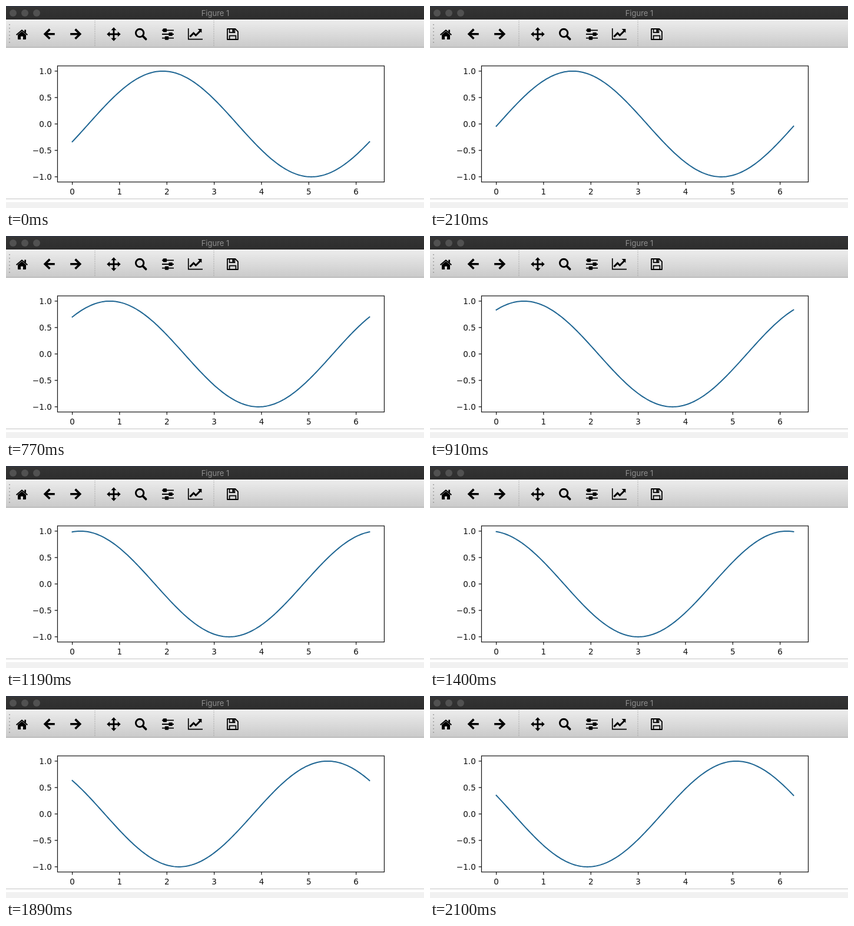
These frames come from a looping animation (710 px wide and 344 px high, 2170 ms). An HTML page:

```html
<!DOCTYPE html>
<html lang="en">
<head>
<meta charset="utf-8">
<title>Figure 1</title>
<style>
  html, body { margin: 0; width: 100%; height: 100%; overflow: hidden; background: #fff; }
  svg { display: block; width: 710px; height: 344px; }
  .title { font: 13px Inter, sans-serif; fill: #8f8f8f; text-anchor: middle; }
  .labels { font: 13.6px "DejaVu Sans", sans-serif; fill: #111; }
  .axes { fill: none; stroke: #111; stroke-width: 1.2; }
  .line { fill: none; stroke: #000; }
</style>
</head>
<body>
<svg viewBox="0 0 710 344">
  <defs>
    <linearGradient id="bar" x2="0" y2="1">
      <stop stop-color="#ededed"/><stop offset="1" stop-color="#cacaca"/>
    </linearGradient>
    <linearGradient id="top" x2="0" y2="1">
      <stop stop-color="#353535"/><stop offset="1" stop-color="#2d2d2d"/>
    </linearGradient>
  </defs>
  <rect width="710" height="344" fill="#fff"/>

  <rect width="710" height="23" fill="url(#top)"/>
  <path d="M0 .5H710" stroke="#2b3448"/>
  <g fill="#515151">
    <circle cx="12" cy="12" r="6"/><circle cx="32" cy="12" r="6"/><circle cx="52" cy="12" r="6"/>
  </g>
  <text class="title" x="355.5" y="17">Figure 1</text>

  <rect y="23" width="710" height="47" fill="url(#bar)"/>
  <path d="M0 70.5H710" stroke="#a2a2a2"/>
  <path d="M6 31V66" stroke="#8c8c8c" stroke-width="1.6" stroke-dasharray="1.6 4.4"/>
  <path d="M151 25V69M353 25V69" stroke="#858585" stroke-dasharray="1 2"/>

  <g id="icons">
    <!-- home -->
    <path d="M27 43.2L34 49V56.2Q34 57 33.2 57H29V51.8H25V57H20.8Q20 57 20 56.2V49Z"/>
    <path class="line" d="M17.6 49.2L27 41.2L36.4 49.2" stroke-width="1.9"/>
    <path d="M31.3 40.5H34V46L31.3 43.7Z"/>
    <!-- back and forward -->
    <g id="arrow"><path class="line" d="M82.8 47.7H67M74.4 39.6L66.2 47.7L74.4 55.8" stroke-width="3.6"/></g>
    <use href="#arrow" transform="matrix(-1 0 0 1 192 0)"/>
    <!-- pan -->
    <path class="line" d="M174 48H192M183 39V57" stroke-width="2.8"/>
    <path id="head" d="M183 36.2L187.6 41.2H178.4Z"/>
    <use href="#head" transform="rotate(90 183 48)"/>
    <use href="#head" transform="rotate(180 183 48)"/>
    <use href="#head" transform="rotate(270 183 48)"/>
    <!-- zoom -->
    <circle class="line" cx="227.2" cy="46" r="6.7" stroke-width="3"/>
    <path class="line" d="M232.2 51L237.6 56.4" stroke-width="3.8" stroke-linecap="round"/>
    <!-- sliders -->
    <path class="line" d="M265 41.4H285M265 48H285M265 54.6H285" stroke-width="1.8"/>
    <path class="line" d="M269.8 38.6V44.2M279.6 45.2V50.8M273 51.8V57.4" stroke="#d9d9d9" stroke-width="6.4"/>
    <path class="line" d="M269.8 38.6V44.2M279.6 45.2V50.8M273 51.8V57.4" stroke-width="4.2"/>
    <!-- chart -->
    <path class="line" d="M309.8 38V56.6H334" stroke-width="1.7"/>
    <path class="line" d="M312.4 52.4L318.6 46.2L322.4 50L330 42.4" stroke-width="3"/>
    <path d="M325.6 39H332.4V45.8Z"/>
    <!-- save -->
    <path class="line" d="M376 39H389.4L394 43.6V57H376Z" stroke-width="1.8" stroke-linejoin="round"/>
    <path class="line" d="M379.6 39V45.2H388.4V39M379.6 57V50.6H390.4V57" stroke-width="1.7"/>
    <path d="M384.4 39.8H387.2V44.6H384.4Z"/>
  </g>

  <path id="curve" fill="none" stroke="#1f6693" stroke-width="2" stroke-linecap="square" stroke-linejoin="round"/>
  <rect class="axes" x="87.5" y="102" width="555" height="197.7"/>
  <path class="axes" id="ticks"/>
  <g class="labels" id="labels"></g>

  <path d="M0 328.5H710" stroke="#c4c4c4"/>
  <rect y="334" width="710" height="10" fill="#f1f1f1"/>
</svg>
<script>
  const STEP_MS = 70, STEPS = 31;
  const X0 = 112.6, X_UNIT = 80.35, Y0 = 200.9, Y_UNIT = 90;
  const px = x => X0 + x * X_UNIT;
  const py = y => Y0 - y * Y_UNIT;
  const byId = id => document.getElementById(id);

  // [step, phase]: the wave drifts slightly faster toward the end.
  const PHASE_KEYS = [[0, -.343], [3, -.043], [8, .457], [13, .987], [17, 1.397], [24, 2.132], [30, 2.782]];

  function phaseAt(step) {
    const i = PHASE_KEYS.findIndex(([s]) => s >= step);
    if (i === 0) return PHASE_KEYS[0][1];
    const [s0, p0] = PHASE_KEYS[i - 1], [s1, p1] = PHASE_KEYS[i];
    return p0 + (p1 - p0) * (step - s0) / (s1 - s0);
  }

  function addLabel(text, x, y, anchor) {
    const el = document.createElementNS("http://www.w3.org/2000/svg", "text");
    el.setAttribute("x", x);
    el.setAttribute("y", y);
    el.setAttribute("text-anchor", anchor);
    el.textContent = text;
    byId("labels").append(el);
  }

  function drawAxes() {
    let ticks = "";
    for (let x = 0; x <= 6; x++) {
      ticks += `M${px(x)} 299.7v4.8`;
      addLabel(x, px(x), 320.5, "middle");
    }
    for (let y = -1; y <= 1; y += .5) {
      ticks += `M87.5 ${py(y)}h-4.8`;
      addLabel(y.toFixed(1).replace("-", "\u2212"), 77.8, py(y) + 5.1, "end");
    }
    byId("ticks").setAttribute("d", ticks);
  }

  function drawCurve(phase) {
    const points = Array.from({ length: 200 }, (_, i) => {
      const x = i / 199 * 2 * Math.PI;
      return `${px(x).toFixed(2)} ${py(Math.sin(x + phase)).toFixed(2)}`;
    });
    byId("curve").setAttribute("d", "M" + points.join("L"));
  }

  const start = performance.now();
  function render() {
    const elapsed = Math.max(0, performance.now() - start);
    drawCurve(phaseAt(Math.floor(elapsed / STEP_MS) % STEPS));
    requestAnimationFrame(render);
  }

  drawAxes();
  render();
</script>
</body>
</html>
```
